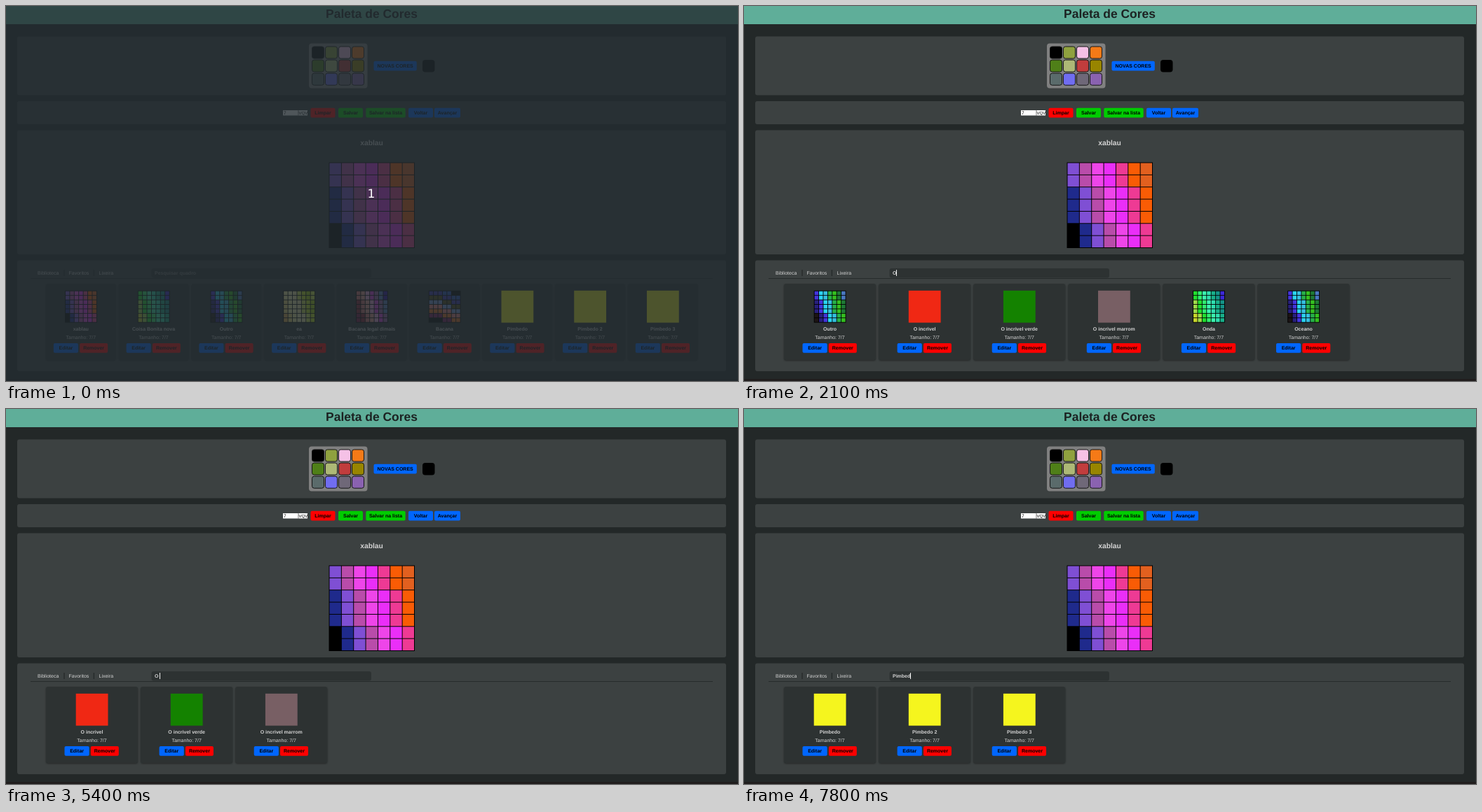
Animation, 1044 px wide and 536 px high, one loop 8 s. Source, as an HTML page:

```html
<!DOCTYPE html>
<html lang="pt">
<head>
<meta charset="utf-8">
<title>Paleta de Cores</title>
<style>
html, body { margin: 0; width: 100%; height: 100%; overflow: hidden; background: #232828; }
svg { display: block; width: 1044px; height: 536px; }
text { font: 7px "Liberation Sans", Arial, sans-serif; fill: #d2d2d2; white-space: pre; text-rendering: geometricPrecision; }
.b { font-weight: bold; }
.m { text-anchor: middle; }
.k { fill: #000; }
.card { filter: drop-shadow(.5px 1.5px 1px rgba(0, 0, 0, .4)); }
</style>
</head>
<body>
<svg viewBox="0 0 1044 536">
  <g id="page"></g>
  <g id="list"></g>
  <text id="query" class="b" x="212" y="384"></text>
  <rect id="caret" y="377" width="1" height="9" fill="#eee"/>
  <g id="count">
    <rect width="1044" height="536" fill="rgba(35,44,49,.8)"/>
    <text class="m" x="521" y="273.5" style="font:17px 'DejaVu Sans',sans-serif;fill:#fff">1</text>
  </g>
</svg>
<script>
const el = id => document.getElementById(id);
const rect = (x, y, w, h, fill, r = 0, more = '') =>
  `<rect x="${x}" y="${y}" width="${w}" height="${h}" rx="${r}" fill="${fill}" ${more}/>`;
const text = (x, y, s, cls = '', style = '') =>
  `<text x="${x}" y="${y}" class="${cls}" style="${style}">${s}</text>`;
const button = (x, y, w, s, fill) =>
  rect(x, y, w, 13.8, fill, 2) + text(x + w / 2, y + 9.4, s, 'b m k');

const BLUE = '#0066ff', RED = '#ff0000', GREEN = '#00cc00';
const PANEL = '#3c4141', DARK = '#2d3232';

// Nine colours fill a board as bands that slide one step at a time.
const bands = colors => (row, col) => colors[col + 2 - (row < 2 ? 0 : row < 5 ? 1 : 2)];
const stacked = colors => (row, col) => colors[row + 2 - (col < 3 ? 0 : col < 5 ? 1 : 2)];
const list = s => s.split(' ').map(c => '#' + c);

const violet = bands(list('000000 1f2a8c 7f4fd4 b94caa ee45e9 ea2ef8 ee3a94 f95c05 e2601f'));
const mint = bands(list('c8d62c 9fdc4a 22e02f 30f070 3cf5b0 2fe0b0 18b08a 149488 3c28d8'));
const ocean = bands(list('1c1414 28207c 4434dc 2ad4f4 35bfe0 27b04a 35c020 1f7a35 4a78c0'));
const lemon = bands(list('e8b050 f2dc78 f7efa0 f8f2b0 f5eeaa d9ea55 c9ea20 abd80a d8f04a'));
const rose = bands(list('7a1440 8f1f30 d97272 ea9a92 efa6dc e03be8 9a5fa8 5a7cc4 2c0aa8'));
const layers = stacked(list('000000 2a50c0 3a30b4 524512 7f9be0 f08484 f07020 841860 000000'));

const boards = [
  ['xablau', violet], ['Coisa Bonita nova', mint], ['Outro', ocean], ['ea', lemon],
  ['Bacana legal dimais', rose], ['Bacana', layers],
  ['Pimbedo', '#f5f51e'], ['Pimbedo 2', '#f5f51e'], ['Pimbedo 3', '#f5f51e'],
  ['O incrivel', '#f02814'], ['O incrivel verde', '#148200'], ['O incrivel marrom', '#785f64'],
  ['Onda', mint], ['Oceano', ocean]
];

function grid(x, y, size, art, line) {
  if (typeof art === 'string') return rect(x, y, size, size, art);
  const step = (size - line) / 7;
  let out = rect(x, y, size, size, '#000');
  for (let i = 0; i < 49; i++) {
    const row = Math.floor(i / 7), col = i % 7;
    out += rect(x + line + col * step, y + line + row * step, step - line, step - line, art(row, col));
  }
  return out;
}

function drawPage() {
  let out = rect(0, 0, 1044, 536, '#232828') + rect(0, 533, 1044, 3, '#201d1d') +
    rect(0, 0, 1044, 26, '#5fae99') +
    text(521.5, 17, 'Paleta de Cores', 'b m', 'font-size:17.46px;fill:#1c2222');
  for (const [y, h] of [[43.5, 84], [136, 33], [177.5, 177.5], [363.5, 158.5]])
    out += rect(16, y, 1011, h, PANEL, 3);

  out += rect(432, 53.5, 83.5, 64, '#808080', 4);
  list('000000 8fa13f f5c1e6 f57a17 4f7f18 adb876 c13d3d 988500 5a6b6b 706df0 6f6878 8a62b0')
    .forEach((c, i) => {
      out += rect(436.5 + i % 4 * 19, 58 + Math.floor(i / 4) * 19.1, 17, 17, c, 3, 'stroke="#151515"');
    });
  out += button(524.5, 78.8, 61.3, 'NOVAS CORES', BLUE) + rect(594, 77, 17.5, 17.5, '#000', 4);

  out += rect(395, 149, 35, 7.5, '#fff') + rect(416.6, 149, .7, 7.5, '#444') +
    text(396, 155.2, '7', 'k', 'font-size:6.5px') + text(417.6, 155.2, 'VQV', 'k', 'font-size:6px') +
    button(434.5, 145.8, 35, 'Limpar', RED) + button(474, 145.8, 35, 'Salvar', GREEN) +
    button(513.3, 145.8, 56.4, 'Salvar na lista', GREEN) +
    button(574, 145.8, 35, 'Voltar', BLUE) + button(611, 145.8, 37, 'Avançar', BLUE);

  out += text(521.5, 199, 'xablau', 'b m', 'font-size:10.3px') + grid(460.5, 223.5, 122.5, violet, 1);

  out += text(45, 384, 'Biblioteca') + text(89.5, 384, 'Favoritos') + text(132.5, 384, 'Lixeira') +
    rect(82.5, 377, 1, 9, '#1e2323') + rect(124.8, 377, 1, 9, '#1e2323') +
    rect(35, 389, 973, 1, '#262b2b') + rect(207.5, 375, 313.5, 13.5, DARK, 3);
  return out;
}

function drawList(query) {
  const found = boards.filter(b => b[0].startsWith(query)).slice(0, 9);
  let out = query ? '' : text(212, 384, 'Pesquisar quadro', 'b', 'fill:#777');
  if (!found.length) return out + text(57, 453.7, 'Biblioteca está vaisa');
  const gap = 4.1, w = Math.min(131, (929.6 + gap) / found.length - gap);
  found.forEach(([name, art], i) => {
    const x = 57 + i * (w + gap), mid = x + w / 2;
    out += rect(x, 397, w, 109, DARK, 3, 'class="card"') +
      grid(mid - 22.8, 406.8, 45.8, art, .9) +
      text(mid, 463.5, name, 'b m') + text(mid, 476, 'Tamanho: 7/7', 'm') +
      button(mid - 39, 482, 35.2, 'Editar', BLUE) + button(mid - 1.7, 482, 40, 'Remover', RED);
  });
  return out;
}

// Time, typed text, caret visible
const steps = [
  [0, '', 0], [300, '', 1], [800, '', 0], [1500, '', 1], [2000, '', 0],
  [2100, 'O', 1], [2300, 'O ', 1], [2500, 'O I', 1], [2700, 'O IN', 1], [3200, 'O IN', 0],
  [3300, 'O I', 1], [3400, 'O ', 1], [3900, 'O ', 0], [4000, 'O i', 1], [4100, 'O in', 1],
  [4700, 'O in', 0], [5200, 'O in', 1], [5300, 'O i', 1], [5400, 'O ', 1], [5500, 'O', 1],
  [5600, '', 1], [5900, '', 0], [6500, 'P', 1], [6600, 'Pi', 1], [6800, 'Pim', 1],
  [7100, 'Pimb', 1], [7700, 'Pimbe', 1], [7800, 'Pimbed', 1]
];

let shown = null;
function frame() {
  const t = performance.now() % 8000;
  const [, query, caret] = steps.findLast(s => s[0] <= t);
  if (query !== shown) {
    shown = query;
    el('list').innerHTML = drawList(query);
    el('query').textContent = query;
    el('caret').setAttribute('x', Math.floor(212 + (query ? el('query').getComputedTextLength() : 0)));
  }
  el('caret').style.opacity = caret;
  el('count').style.display = t < 100 ? '' : 'none';
  requestAnimationFrame(frame);
}

el('page').innerHTML = drawPage();
frame();
</script>
</body>
</html>
```
